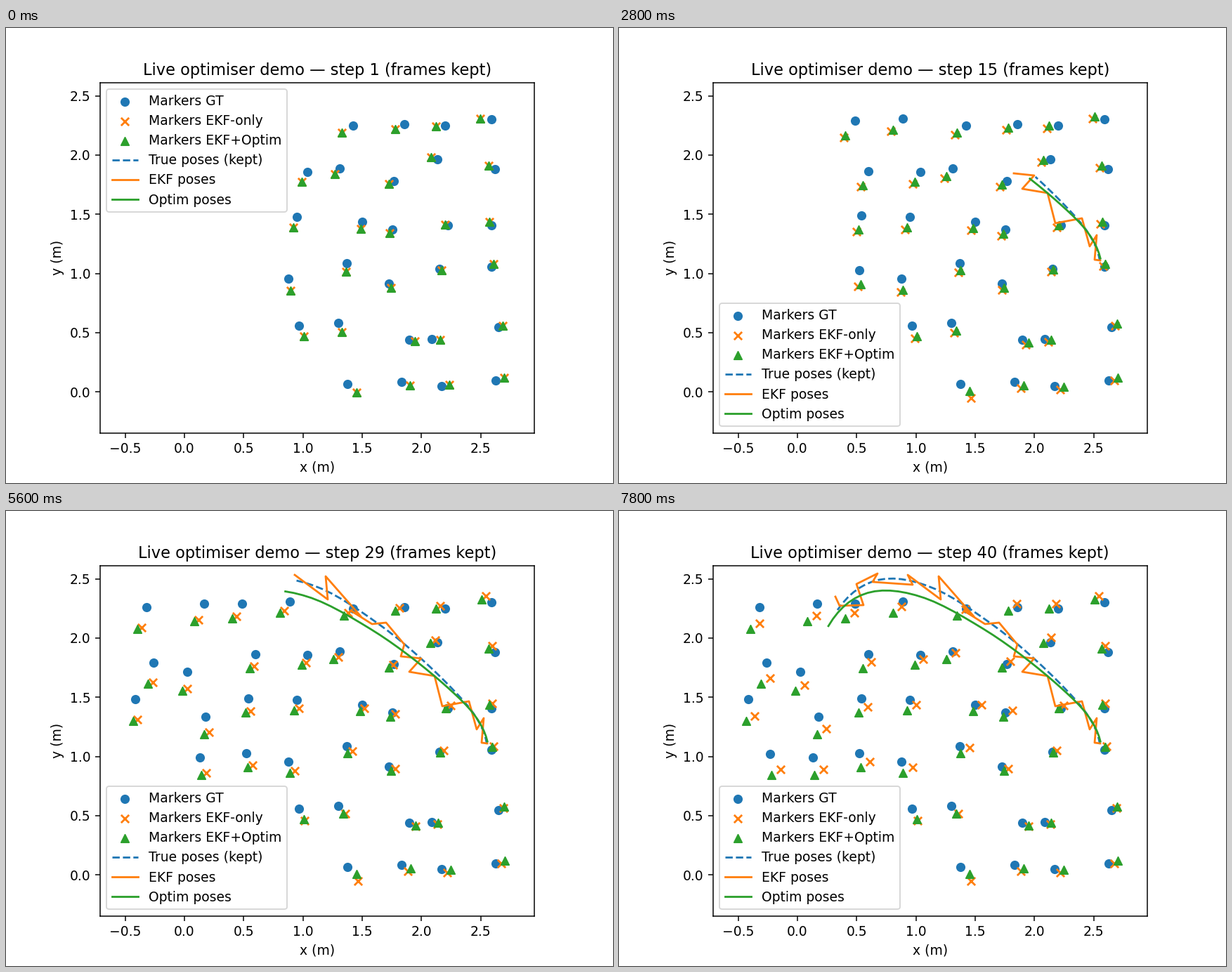
Animation of 864x648 px, one loop 8000 ms. Source, as a matplotlib script:

```python
import numpy as np
import matplotlib.pyplot as plt
from matplotlib.animation import FuncAnimation

STEPS = 40
SCALE, X0, Y0 = 168.7, 253.9, 518.3   # pixels per metre, pixel of the origin
REACH = 287                           # sensor range in pixels
TILT, PIVOT = 0.0715, (630, 322)      # heading error the optimiser settles on

k = np.arange(1, STEPS + 1)
rng = np.random.default_rng(4)


def points(*xy):
    return np.array(xy, float).reshape(-1, 2)


def to_m(p):
    return np.stack([p[..., 0] - X0, Y0 - p[..., 1]], axis=-1) / SCALE


def turn(p, angle, pivot):
    """Turn points by a small angle about a pivot."""
    return p + angle * np.stack([p[:, 1] - pivot[1], pivot[0] - p[:, 0]], axis=1)


def zigzag(keys, pts):
    return np.stack([np.interp(k, keys, c) for c in pts.T], axis=1)


def smooth(keys, pts):
    """Cubic Hermite path through pts, one point per step."""
    keys = np.array(keys, float)
    i = np.clip(np.searchsorted(keys, k, side="right") - 1, 0, len(keys) - 2)
    h = (keys[i + 1] - keys[i])[:, None]
    u = (k - keys[i])[:, None] / h
    m = np.gradient(pts, keys, axis=0, edge_order=2)
    return ((2 * u**3 - 3 * u**2 + 1) * pts[i] + (u**3 - 2 * u**2 + u) * h * m[i]
            + (3 * u**2 - 2 * u**3) * pts[i + 1] + (u**3 - u**2) * h * m[i + 1])


# Marker map, row by row, in stage pixels.
truth = points(
    200.5, 137, 282, 132, 336, 132, 404, 128.5, 494, 139, 567, 137, 625, 139, 691, 130,
    210, 215.5, 258, 229, 355, 204, 429, 205, 475, 200, 552, 217.5, 614, 186.5, 696, 200.5,
    184.5, 267.5, 284, 293, 345, 267, 414, 269, 507, 276, 550, 287, 629, 281, 691, 280.5,
    215, 346, 276, 350.5, 342, 344.5, 402, 357, 485, 335, 545.5, 364, 617, 343, 691, 340,
    417, 423.5, 473, 419.5, 574, 443.5, 606, 442.5, 701.5, 426,
    486, 507, 563, 504.5, 620, 510, 697.5, 502.5)

# The robot's arc; the optimised one is the same arc, slightly turned.
key_steps = [1, 6, 11, 20, 26, 33, 40]
true_path = smooth(key_steps, points(684.5, 332, 669, 293.5, 634, 252, 530.5, 161,
                                     450, 111, 370, 98, 311, 141))
opt_path = turn(true_path, TILT, PIVOT)
ekf_path = zigzag(
    [1, 3, 4, 5, 8, 10, 12, 13, 14, 15, 17, 19, 20, 22, 23, 25, 26, 29, 30, 33, 34, 35,
     37, 39, 40],
    points(685, 331, 677, 330, 680, 295, 670, 311, 659, 271, 621, 278, 610, 235,
           574, 229, 591, 210, 562, 207, 567, 190, 541, 159, 521, 161, 491, 142,
           505, 150, 455, 93, 458, 126, 411, 91, 418, 105, 361, 101, 368, 89,
           338, 104, 348, 134, 314, 135, 308, 122))

near = np.linalg.norm(true_path[:, None] - truth, axis=2) <= REACH
seen = np.logical_or.accumulate(near)

# The EKF map swings about a wandering pivot; markers out of range stay put.
angle = np.interp(k, key_steps, [TILT, 0.12, 0.064, 0.077, 0.077, 0.075, 0.075])
pivot = zigzag(key_steps, points(*PIVOT, 675, 318, 705, 402, 640, 322,
                                 595, 260, 555, 195, 505, 150))
ekf = [turn(truth, TILT, PIVOT)]
for s in range(1, STEPS):
    ekf.append(np.where(near[s][:, None], turn(truth, angle[s], pivot[s]), ekf[-1]))
ekf = np.array(ekf)

# Both maps share a noisy first guess that fades over five steps.
settled = turn(truth, TILT, PIVOT)
noise = rng.normal(0, 1.5, truth.shape) * np.clip((6 - k) / 5, 0, 1)[:, None, None]

marker_sets = [to_m(np.repeat(truth[None], STEPS, axis=0)),
               to_m(ekf + noise), to_m(settled + noise)]
paths = [to_m(true_path), to_m(ekf_path), to_m(opt_path)]

# Is any known marker in the upper left corner?
corner = (seen & (settled[:, 0] < 400) & (settled[:, 1] < 263)).any(axis=1)

fig, ax = plt.subplots(figsize=(6.4, 4.8), dpi=135)
ax.set_aspect("equal")
ax.set_xlim(-0.7122, 2.9518)
ax.set_ylim(-0.3463, 2.6114)
ax.set_xlabel("x (m)")
ax.set_ylabel("y (m)")
title = ax.set_title("")

dots = [ax.scatter([], [], c=c, marker=m, label=label) for c, m, label in [
    ("C0", "o", "Markers GT"),
    ("C1", "x", "Markers EKF-only"),
    ("C2", "^", "Markers EKF+Optim")]]
lines = [ax.plot([], [], style, color=c, label=label)[0] for c, style, label in [
    ("C0", "--", "True poses (kept)"),
    ("C1", "-", "EKF poses"),
    ("C2", "-", "Optim poses")]]
legend = ax.legend(loc="upper left", labelspacing=0.49)


def draw(s):
    title.set_text(f"Live optimiser demo — step {s + 1} (frames kept)")
    for dot, pos in zip(dots, marker_sets):
        dot.set_offsets(pos[s][seen[s]])
    for line, path in zip(lines, paths):
        line.set_data(path[:s + 1].T)
    legend.set_loc("lower left" if corner[s] else "upper left")
    return [title, legend, *dots, *lines]


anim = FuncAnimation(fig, draw, frames=STEPS, interval=200, repeat=True)
plt.show()
```
